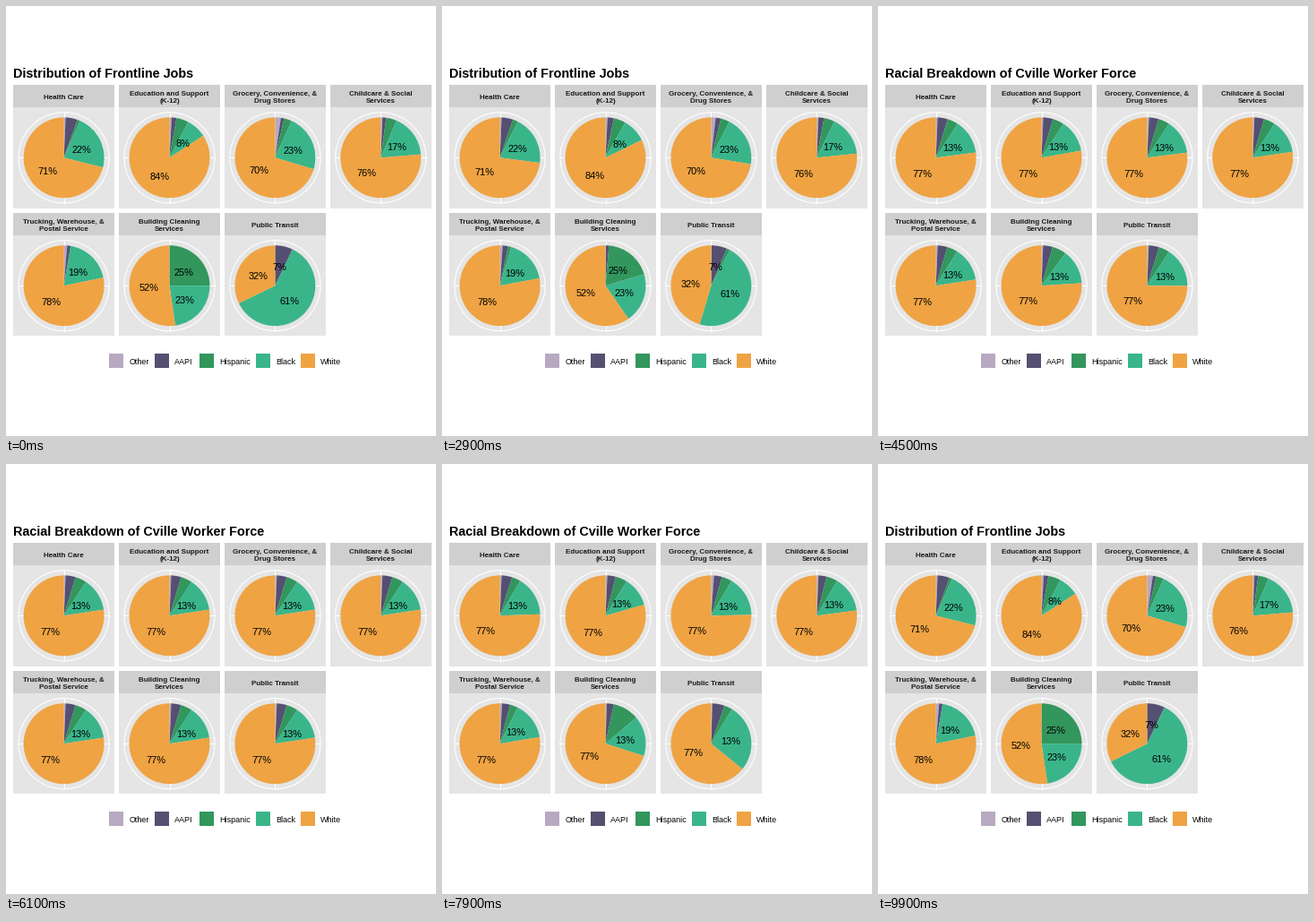
Write a matplotlib script that moves like this. It is 480 px wide and 480 px high and loops after 10000 ms.

```python
import math

import matplotlib.pyplot as plt
import numpy as np
from matplotlib.animation import FuncAnimation
from matplotlib.patches import Circle, Rectangle, Wedge

plt.rcParams["font.family"] = "Liberation Sans"

SIZE, DPI = 480, 100
PX = 72 / DPI  # points per pixel
FRAMES, INTERVAL = 100, 100
HOLD, MOVE = 17, 33

PANEL, STRIP = 112.4, 25.1
LEFT, TOP = 8.4, 88.0
STEP_X, STEP_Y = 117.9, 142.9
PIE_R, RING_R, LABEL_R = 0.4 * PANEL, 0.45 * PANEL, 0.2 * PANEL

GROUPS = ["Other", "AAPI", "Hispanic", "Black", "White"]
COLORS = ["#B8A9C1", "#554F72", "#32965D", "#3AB58A", "#EFA343"]
KEY_X = [115, 166, 216, 279, 329]

TITLES = ["Distribution of Frontline Jobs",
          "Racial Breakdown of Cville Worker Force"]
JOBS = {
    "Health Care": [0.7, 4.8, 1.1, 22.3, 71.1],
    "Education and Support\n(K-12)": [0.9, 1.9, 4.9, 8.1, 84.2],
    "Grocery, Convenience, &\nDrug Stores": [2.3, 1.3, 3.1, 22.9, 70.4],
    "Childcare & Social\nServices": [0.7, 1.5, 4.2, 17.3, 76.3],
    "Trucking, Warehouse, &\nPostal Service": [1.3, 1.4, 0, 19.1, 78.2],
    "Building Cleaning\nServices": [0, 0, 25, 22.7, 52.3],
    "Public Transit": [0, 7.1, 0, 60.7, 32.2],
}
WORKFORCE = np.array([0.7, 4.0, 4.5, 13.4, 77.4])
MIN_LABEL = 6

fig = plt.figure(figsize=(SIZE / DPI, SIZE / DPI), dpi=DPI, facecolor="white")
ax = fig.add_axes([0, 0, 1, 1])
ax.set_xlim(0, SIZE)
ax.set_ylim(SIZE, 0)
ax.axis("off")


def write(x, y, text, size, **style):
    return ax.text(x, y, text, fontsize=size * PX, va="baseline", **style)


def box(x, y, w, h, color):
    ax.add_patch(Rectangle((x, y), w, h, facecolor=color, linewidth=0))


def percent(share):
    return f"{share:.0f}%" if share >= MIN_LABEL else ""


class Pie:
    def __init__(self, index, name, shares):
        row, col = divmod(index, 4)
        x, y = LEFT + col * STEP_X, TOP + row * STEP_Y
        self.shares = np.array(shares, dtype=float)
        self.cx = x + PANEL / 2
        self.cy = y + STRIP + PANEL / 2
        box(x, y, PANEL, STRIP, "#CFCFCF")
        box(x, y + STRIP, PANEL, PANEL, "#E5E5E5")
        self.draw_strip(name, y)
        self.draw_grid()
        self.wedges = [
            ax.add_patch(Wedge((self.cx, self.cy), PIE_R, -90, 270,
                               facecolor=c, linewidth=0, zorder=3))
            for c in COLORS]
        self.labels = [write(0, 0, "", 11.04, ha="center", zorder=4)
                       for _ in COLORS]

    def draw_strip(self, name, y):
        lines = name.split("\n")
        base = y + 16.1 - 4.3 * (len(lines) - 1)
        for i, line in enumerate(lines):
            write(self.cx, base + 8.64 * i, line, 8, ha="center",
                  weight="bold", color="#1A1A1A")

    def draw_grid(self):
        line = dict(linewidth=1.1 * PX, zorder=2)
        ax.add_patch(Circle((self.cx, self.cy), RING_R, fill=False,
                            edgecolor="white", **line))
        for dx, dy in [(RING_R, 0), (0, RING_R)]:
            ax.plot([self.cx - dx, self.cx + dx],
                    [self.cy - dy, self.cy + dy], color="white", **line)

    def update(self, p):
        shares = self.shares + (WORKFORCE - self.shares) * p
        shown = WORKFORCE if p > 0.5 else self.shares
        start = 0.0
        for wedge, label, share, value in zip(self.wedges, self.labels,
                                              shares, shown):
            end = start + share
            wedge.set_visible(share > 0)
            wedge.set_theta1(start * 3.6 - 90)
            wedge.set_theta2(end * 3.6 - 90)
            mid = math.radians((start + end) * 1.8)
            label.set_position((self.cx + LABEL_R * math.sin(mid) - 0.2,
                                self.cy - LABEL_R * math.cos(mid) + 4.6))
            label.set_text(percent(value))
            start = end


title = write(8, 80, TITLES[0], 14.4, weight="bold")
pies = [Pie(i, name, shares) for i, (name, shares) in enumerate(JOBS.items())]

for x, name, color in zip(KEY_X, GROUPS, COLORS):
    box(x - 0.2, 388, 16.4, 16.4, color)
    write(x + 22.4, 399.8, name, 9)


def progress(frame):
    """Hold, ease to the second state, hold, ease back."""
    half, step = divmod(frame, HOLD + MOVE)
    t = max(0, step - HOLD) / MOVE
    eased = (1 - math.cos(math.pi * t)) / 2
    return 1 - eased if half else eased


def draw(frame):
    p = progress(frame)
    title.set_text(TITLES[p > 0.5])
    for pie in pies:
        pie.update(p)
    return []


anim = FuncAnimation(fig, draw, frames=FRAMES, interval=INTERVAL,
                     repeat=True, repeat_delay=0)
plt.show()
```
